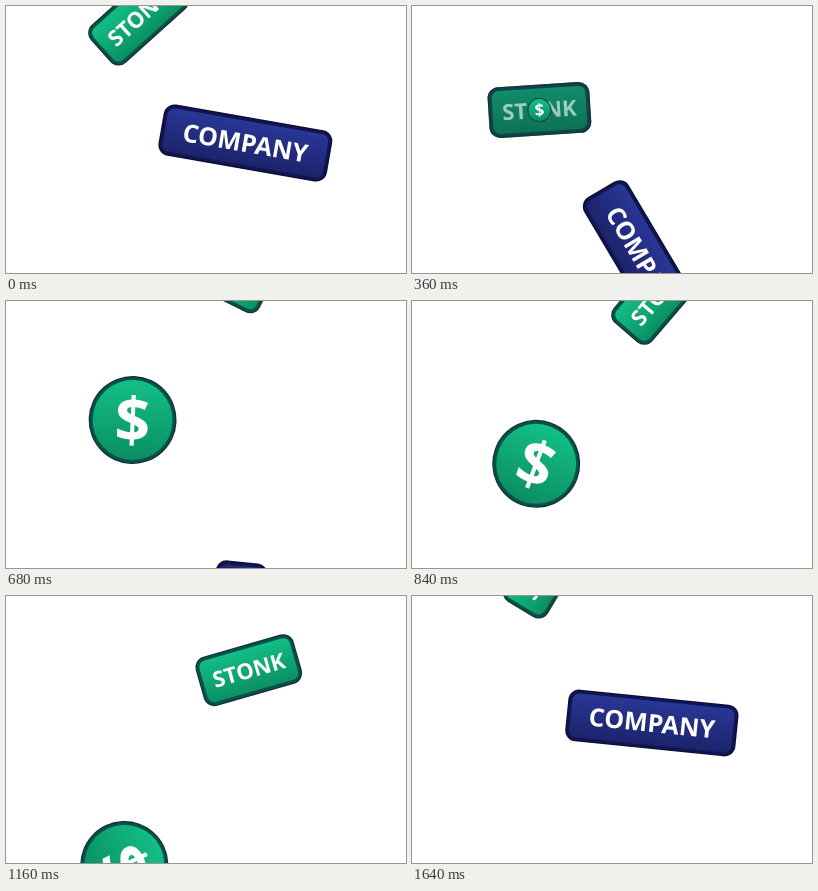
These frames come from a looping animation (400 px wide and 267 px high, 1680 ms). An HTML page with a canvas:

```html
<!DOCTYPE html>
<html lang="en">
<head>
<meta charset="utf-8">
<title>Stonk drop</title>
<style>
  html, body { margin: 0; width: 100%; height: 100%; overflow: hidden; background: #fff; }
  canvas { display: block; width: 400px; height: 267px; }
</style>
</head>
<body>
<canvas id="stage" width="400" height="267"></canvas>
<script>
const ctx = document.getElementById('stage').getContext('2d');
const LOOP = 1680, STEP = 40;
const MID_Y = 112;

// Fall path: [time in ms, distance from the middle of the stage]
const PATH = [
  [400, -215], [680, -153], [920, -101], [1080, -59], [1240, -17], [1280, -8],
  [1360, 0], [1480, 1], [1600, 7], [1640, 15], [1680, 25], [1840, 77.5],
  [2040, 145], [2360, 234], [2700, 310]
];

const GREEN = { top: '#14c189', bottom: '#0a8c5f', edge: '#0a5145', rim: '#12323f' };
const BLUE = { top: '#2a389a', bottom: '#1b2267', edge: '#10154f', rim: '#0a0e38' };
const LABEL = '"Open Sans", "Noto Sans", sans-serif';

const clamp = v => Math.min(1, Math.max(0, v));

function slope(i) {
  const a = PATH[Math.max(0, i - 1)], b = PATH[Math.min(PATH.length - 1, i + 1)];
  return (b[1] - a[1]) / (b[0] - a[0]);
}

// Smooth curve through the path points
function fall(t) {
  const last = PATH.length - 1;
  if (t <= PATH[0][0]) return PATH[0][1];
  if (t >= PATH[last][0]) return PATH[last][1];
  const i = PATH.findIndex(p => p[0] > t) - 1;
  const [t0, y0] = PATH[i], [t1, y1] = PATH[i + 1];
  const d = t1 - t0, u = (t - t0) / d, v = 1 - u;
  return y0 * (1 + 2 * u) * v * v + y1 * u * u * (3 - 2 * u)
       + d * u * v * (slope(i) * v - slope(i + 1) * u);
}

function boxPath(w, h, r) {
  ctx.beginPath();
  ctx.roundRect(-w / 2, -h / 2, w, h, r);
}

function discPath(w) {
  ctx.beginPath();
  ctx.arc(0, 0, w / 2, 0, Math.PI * 2);
}

function badge(trace, w, h, colors, text, size) {
  const layer = (inset, fill) => {
    trace(w - inset * 2, h - inset * 2, 11 - inset);
    ctx.fillStyle = fill;
    ctx.fill();
  };
  const shade = ctx.createLinearGradient(0, -h / 2, 0, h / 2);
  shade.addColorStop(0, colors.top);
  shade.addColorStop(1, colors.bottom);
  layer(0, colors.rim);
  layer(1.2, colors.edge);
  layer(4, shade);
  ctx.font = `bold ${size}px ${LABEL}`;
  ctx.textAlign = 'center';
  ctx.textBaseline = 'alphabetic';
  ctx.fillStyle = '#fff';
  ctx.fillText(text, 0, size * 0.357);
}

const stonk = () => badge(boxPath, 102, 51, GREEN, 'STONK', 22);
const coin = () => badge(discPath, 88, 88, GREEN, '$', 62);
const company = () => badge(boxPath, 171, 52, BLUE, 'COMPANY', 25);

// A green box falls in, then swaps to another badge in the middle
function drop(x, t, result) {
  const d = fall(t);
  ctx.save();
  ctx.translate(x - d * 0.055, MID_Y + d);
  ctx.rotate((d * 0.412 - 0.4) * Math.PI / 180);

  const alpha = 1 - clamp((t - 1240) / 100);
  if (alpha >= 0.5) {
    if (alpha < 1) {
      boxPath(102, 51, 11);
      ctx.fillStyle = '#1c3048';
      ctx.fill();
    }
    ctx.globalAlpha = alpha;
    stonk();
    ctx.globalAlpha = 1;
  }

  const grow = clamp((t - 1235) / 165);
  if (grow > 0) {
    ctx.scale(grow, grow);
    result();
  }
  ctx.restore();
}

function draw(t) {
  ctx.clearRect(0, 0, 400, 267);
  drop(127, t < 1440 ? t + 920 : t - 910, coin);
  drop(240.7, t < 800 ? t + LOOP : t, company);
  if (t >= 400 && t < 800) drop(240.7, t, company);
}

const start = performance.now();
function tick() {
  const t = (performance.now() - start) % LOOP;
  draw(Math.floor(t / STEP) * STEP);
  requestAnimationFrame(tick);
}
tick();
</script>
</body>
</html>
```
